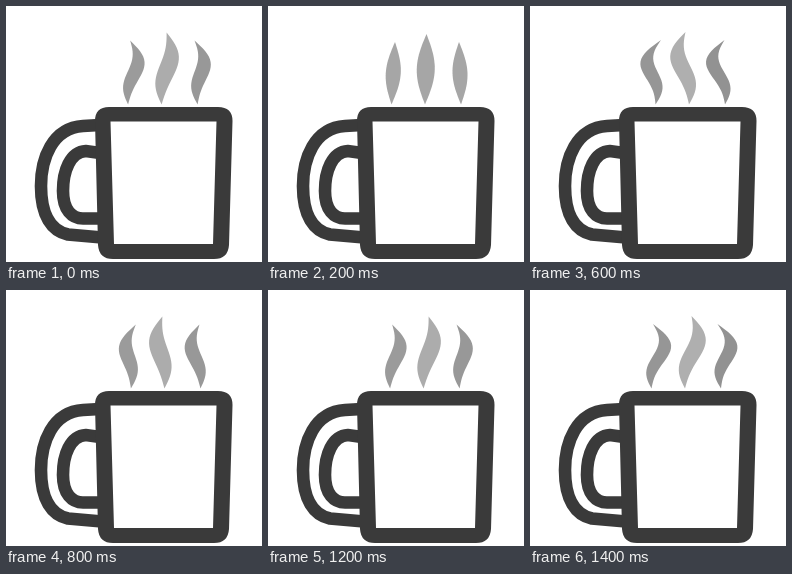
Animation, 256 px wide and 256 px high, one loop 1600 ms. Source, as an HTML page:

```html
<!DOCTYPE html>
<html lang="en">
<head>
<meta charset="utf-8">
<title>Steaming mug</title>
<style>
  html, body { margin: 0; width: 100%; height: 100%; overflow: hidden; background: #fff; }
  svg { display: block; width: 100%; height: 100%; }
</style>
</head>
<body>
<svg viewBox="0 0 256 256">
  <g id="steam"><path/><path/><path/></g>
  <g fill="none" stroke="#3a3a3a" stroke-width="12.6">
    <path d="M94 119L77 120C46 122 35 153 35 180C35 210 46 225 62 228.5L96 231.5"/>
    <path d="M94 147L80 145C64 146 57 165 57 185C57 204 66 212.5 77 212.5L96 212.5"/>
  </g>
  <path fill="#3a3a3a" fill-rule="evenodd" d="M103 101H212Q226.500 101 226.500 115L223 239Q222 253 208 253H107Q93 253 92 239L89 115Q89 101 103 101ZM104.500 115.500L108 238H207L210.500 115.500Z"/>
</svg>
<script>
const STEP = 200, STEPS = 8, STILL_GRAY = 166;
const paths = document.querySelectorAll('#steam path');

// Tips at (top, y) and (bottom, 98.5); lean moves the top tip, drift moves the belly
const plumes = [
  { top: 127, bottom: 123.5, y: 34, lean: -4, drift: 8, bend: 6, width: 7.5, gray: 150 },
  { top: 158.5, bottom: 157, y: 26, lean: 3, drift: 5, bend: 5, width: 9, gray: 175 },
  { top: 191, bottom: 193, y: 34, lean: -3.5, drift: 8, bend: 6, width: 7.5, gray: 146 }
];

// One edge of a plume: side is -1 for left, 1 for right
function edgePoint(p, sway, side, t) {
  const top = p.top + p.lean * sway, bottom = p.bottom - 2 * sway;
  const belly = (p.drift * sway + p.width * side) * Math.sin(Math.PI * t);
  const x = top + (bottom - top) * t + belly + p.bend * sway * Math.sin(2 * Math.PI * t);
  const y0 = p.y + 2 * (1 - Math.abs(sway));
  return `${x.toFixed(2)} ${(y0 + (98.5 - y0) * t).toFixed(2)}`;
}

function outline(p, sway) {
  const points = [], n = 24;
  for (let i = 0; i <= n; i++) points.push(edgePoint(p, sway, 1, i / n));
  for (let i = n - 1; i > 0; i--) points.push(edgePoint(p, sway, -1, i / n));
  return `M${points.join('L')}Z`;
}

function draw(ms) {
  const step = Math.floor(ms / STEP) % STEPS;
  const sway = Math.cos(2 * Math.PI * (step + 1) / STEPS);
  plumes.forEach((p, i) => {
    const gray = Math.round(STILL_GRAY + (p.gray - STILL_GRAY) * Math.abs(sway));
    paths[i].setAttribute('d', outline(p, sway));
    paths[i].setAttribute('fill', `rgb(${gray},${gray},${gray})`);
  });
}

const start = performance.now();
function tick() {
  draw(performance.now() - start);
  requestAnimationFrame(tick);
}
tick();
</script>
</body>
</html>
```
